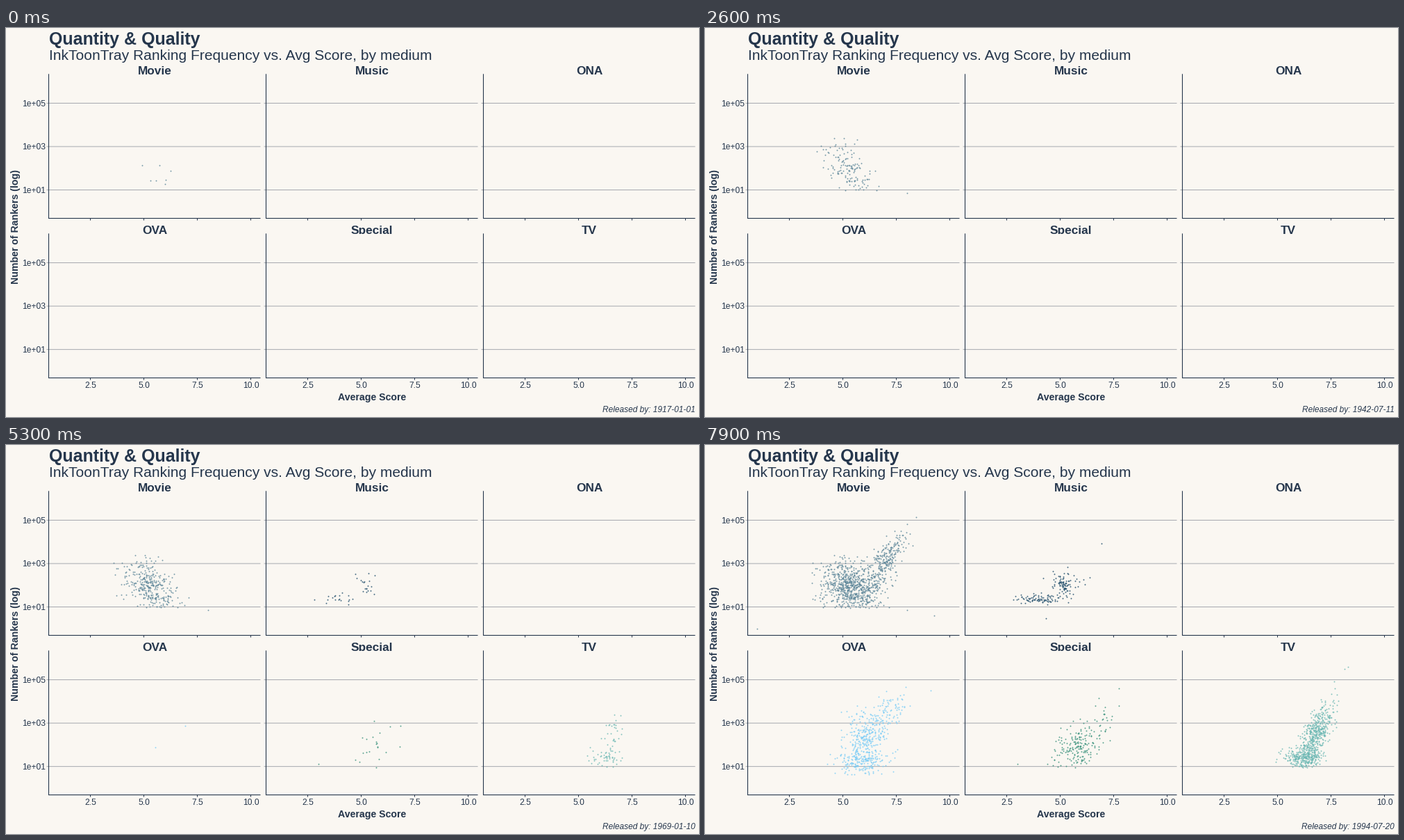
Recreate the animation shown at these times as a matplotlib script. Size 998 px wide and 561 px high, loop 8000 ms.

```python
import numpy as np
import matplotlib.pyplot as plt
from matplotlib.animation import FuncAnimation
from matplotlib.patches import Rectangle

W, H, DPI = 998, 561, 64
PT = 72 / DPI  # points per pixel
FRAMES, INTERVAL = 80, 100
BG, INK, GRID = "#faf7f2", "#25364c", "#a6a9af"
FIRST, LAST = np.datetime64("1917-01-01"), np.datetime64("1994-07-20")

PANEL_W, PANEL_H = 305, 208.2
LEFT, TOP, STEP_X, STEP_Y = 61.5, 66.3, 313, 230.1
UNIT, DECADE = 30.8, 31.27
FLOOR = 0.95
BOOM = 53  # frame at which the popular titles start to show up

plt.rcParams["font.family"] = "Liberation Sans"
fig = plt.figure(figsize=(W / DPI, H / DPI), dpi=DPI, facecolor=BG)
ax = fig.add_axes([0, 0, 1, 1])
ax.set(xlim=(0, W), ylim=(H, 0))
ax.axis("off")

rng = np.random.default_rng(17)
frames = np.arange(FRAMES)


def px(left, score):
    return left - 17 + UNIT * score


def py(top, log_n):
    return top + 198.5 - DECADE * log_n


def label(x, y, text, size, ha="left", **kw):
    return ax.text(x, y, text, fontsize=size * PT, ha=ha, va="baseline",
                   color=INK, **kw)


def line(xs, ys, color=INK, width=1.0, z=2):
    ax.plot(xs, ys, color=color, lw=width * PT, zorder=z, snap=False,
            solid_capstyle="butt")


# --- where titles land: each rule maps release times to (score, log n) ---

def noise(n):
    return np.clip(rng.standard_normal(n), -2.6, 2.6)


def spot(t, x, y, sx, sy, slope=0.0, floor=FLOOR):
    """Cloud around (x, y), folded up at the lower bound."""
    dx = sx * noise(len(t))
    logs = y + slope * dx + sy * noise(len(t))
    return np.column_stack([x + dx, floor + np.abs(logs - floor)])


def mix(a, b, share):
    """Take a given share of the rows from b, the rest from a."""
    return np.where((rng.random(len(a)) < share)[:, None], b, a)


def late(t):
    return np.clip((t - BOOM) / (FRAMES - 1 - BOOM), 0, 1)


def movie(t):
    age = t / FRAMES
    body = spot(t, 5.2 + .3 * age, 1.95, .48 + .35 * age, .5, age - .8)
    arm = spot(t, 6.95, 3.1, .5, .42, 1.05)
    return mix(body, arm, .65 * late(t))


def music(t):
    low = spot(t, 3.7 + .8 * late(t), 1.37, .55, .11)
    core = spot(t, 5.1, 2.03, .15, .17)
    wide = spot(t, 5.3, 2.15, .42, .27)
    return mix(low, mix(core, wide, .45), .48)


def ova(t):
    body = spot(t, 6.0, 2.2, .42, .7, .15, floor=.6)
    low = spot(t, 5.9, 1.25, .68, .27, floor=.6)
    arm = spot(t, 6.8, 3.2, .6, .42, .75)
    return mix(mix(body, low, .35), arm, .26)


def special(t):
    body = spot(t, 5.6 + .5 * late(t), 1.95, .5, .5, .25)
    arm = spot(t, 6.85, 3.0, .35, .5, .5)
    return mix(body, arm, .3 * late(t))


def tv(t):
    grow = late(t)
    low = spot(t, 6.1, 1.4, .45, .22)
    arm = spot(t, 6.6 + .3 * grow, 2.15 + .5 * grow, .26 + .2 * grow, .5, 1.3)
    return mix(arm, low, .48 - .3 * grow)


def since(start):
    return np.maximum(frames - start, 0)


# name: colour, placing rule, number of titles out by each frame
PANELS = {
    "Movie": ("#5d8699", movie, 5 * frames + .4 * since(41) ** 2),
    "Music": ("#1d4b69", music, 5.3 * since(46)),
    "ONA": (INK, None, None),
    "OVA": ("#7accf6", ova, 550 * np.exp(.21 * (frames - FRAMES + 1))),
    "Special": ("#36907a", special, 1.6 * since(45) + .13 * since(45) ** 2),
    "TV": ("#6cb8b4", tv, 8.5 * since(46) + .41 * since(46) ** 2),
}

# lone titles: release frame, score, log n
LONE = {
    "Movie": [(0, 4.92, 2.14), (0, 5.73, 2.14), (0, 6.25, 1.88),
              (0, 5.31, 1.43), (0, 5.58, 1.43), (0, 6.02, 1.47),
              (0, 6.0, 1.26), (8, 8.0, .86), (9, 5.67, 3.32),
              (60, 1.0, 0), (63, 9.26, .61), (68, 8.43, 5.14)],
    "Music": [(65, 4.33, .47), (77, 6.93, 3.93)],
    "OVA": [(78, 9.11, 4.52)],
    "Special": [(50, 3.0, 1.12), (66, 7.74, 3.81), (77, 7.75, 4.6)],
    "TV": [(69, 8.13, 5.51), (76, 8.3, 5.6)],
}


def releases(name, rule, totals):
    """Release frames in order, with the matching points."""
    born = np.repeat(frames[1:], np.diff(totals.astype(int)))
    rows = np.vstack([np.column_stack([born, rule(born)]), LONE[name]])
    rows = rows[np.argsort(rows[:, 0], kind="stable")]
    return rows[:, 0], rows[:, 1], rows[:, 2]


def draw_panel(name, left, top):
    right, bottom = left + PANEL_W, top + PANEL_H
    for power in (1, 3, 5):
        y = py(top, power)
        line([left - 3, right], [y, y], GRID, z=1)
        if left == LEFT:
            label(57, y + 4.2, f"1e+0{power}", 12, "right")
    for score in (2.5, 5.0, 7.5, 10.0):
        x = px(left, score)
        line([x, x], [bottom, bottom + 3])
        if top > TOP:
            label(x, 519, f"{score:.1f}", 12, "center")
    line([left, left], [top, bottom + .5], width=1.1)
    line([left, right], [bottom, bottom], width=1.1)
    # the heading is cut off at the panel's upper edge
    strip = label(left + PANEL_W / 2, top + .2, name, 17.3, "center",
                  weight="bold")
    strip.set_clip_path(Rectangle((left, top + .7), PANEL_W, -24,
                                  transform=ax.transData))
    strip.set_clip_on(True)


layers = []
for k, (name, (color, rule, totals)) in enumerate(PANELS.items()):
    left, top = LEFT + STEP_X * (k % 3), TOP + STEP_Y * (k // 3)
    draw_panel(name, left, top)
    if rule:
        t, x, y = releases(name, rule, totals)
        spots = np.column_stack([px(left, x), py(top, y)])
        dots = ax.scatter([], [], s=(1.9 * PT) ** 2, color=color, alpha=.85,
                          linewidths=0, zorder=3)
        layers.append((dots, t, spots))

label(62, 24, "Quantity & Quality", 25, weight="bold")
label(62, 45.5, "InkToonTray Ranking Frequency vs. Avg Score, by medium", 21)
label(527, 536.5, "Average Score", 14.1, "center", weight="bold")
label(18.5, 286, "Number of Rankers (log)", 14.1, "center", weight="bold",
      rotation=90, rotation_mode="anchor")
caption = label(993, 554, "", 11.9, "right", style="italic")


def update(i):
    days = round((LAST - FIRST).astype(int) * i / (FRAMES - 1))
    caption.set_text(f"Released by: {FIRST + np.timedelta64(days, 'D')}")
    for dots, t, spots in layers:
        dots.set_offsets(spots[:np.searchsorted(t, i, side="right")])
    return [caption] + [layer[0] for layer in layers]


anim = FuncAnimation(fig, update, frames=FRAMES, interval=INTERVAL,
                     repeat=True, repeat_delay=0)
plt.show()
```
